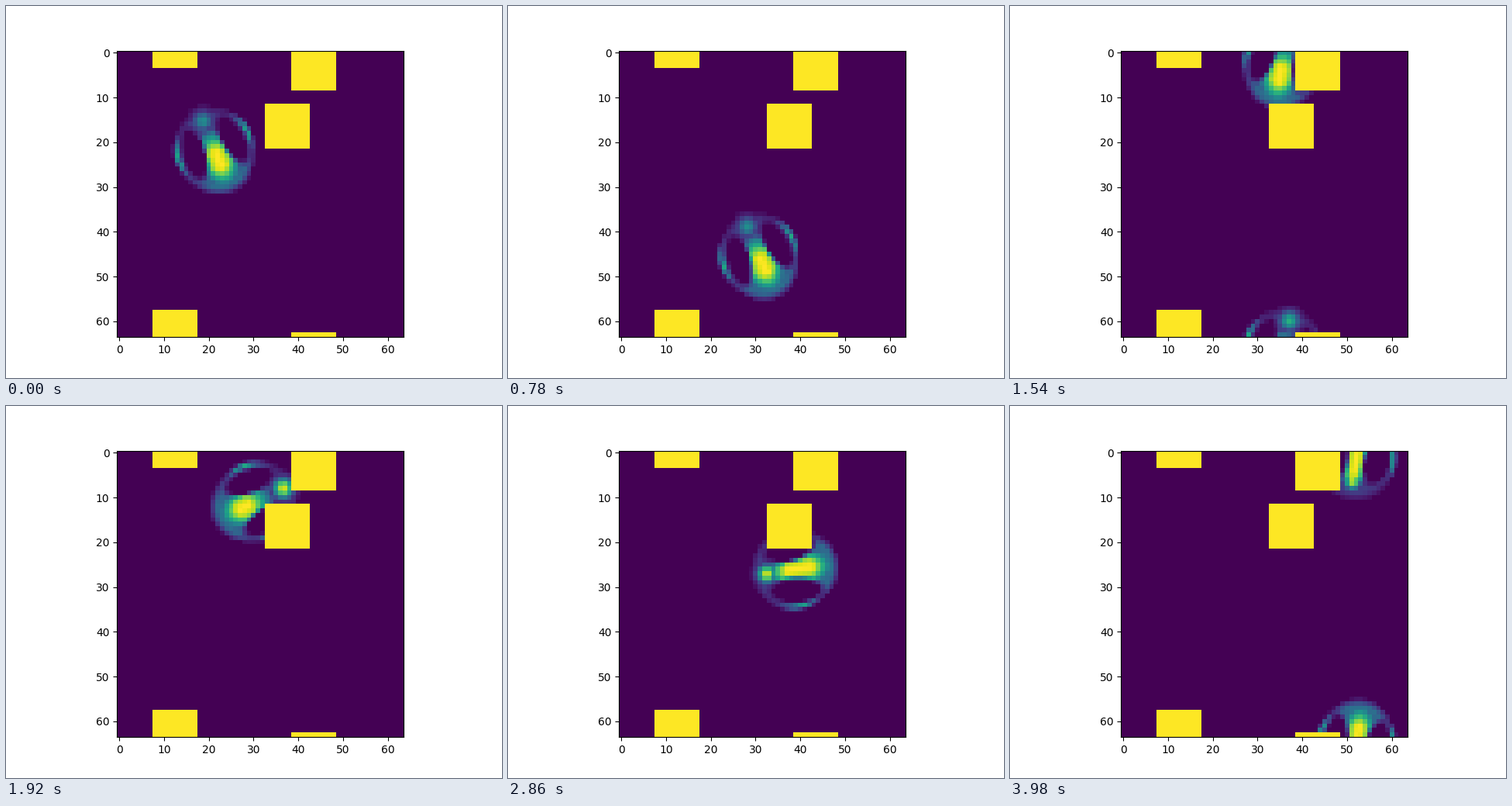
Write a matplotlib script that moves like this. It is 640x480 px and loops after 4000 ms.

```python
import numpy as np
import matplotlib.pyplot as plt
from matplotlib.animation import FuncAnimation

SIZE = 64
FRAMES = 200
BLOCK = 10

# Key poses: step, x, y (unwrapped), heading in degrees
POSES = np.array([
    (0, 21.5, 22.1, 67.5),
    (58, 35.5, 57.1, 67.5),
    (64, 36.9, 60.7, 67.5),
    (96, 30.1, 75.2, 154),
    (119, 29.7, 87.6, 78.5),
    (136, 36.5, 91, 15),
    (166, 45.3, 80.5, -73),
    (199, 52.1, 64.8, -81),
])
TIMES, KEYS = POSES[:, 0], POSES[:, 1:]
SLOPES = np.gradient(KEYS, TIMES, axis=0)

rows, cols = np.mgrid[:SIZE, :SIZE]
walls = np.zeros((SIZE, SIZE), bool)
for x, y in [(8, 58), (39, 63), (33, 12)]:
    walls |= ((cols - x) % SIZE < BLOCK) & ((rows - y) % SIZE < BLOCK)


def ramp(x):
    return np.clip(x, 0, 1)


def ease(t, start, end):
    s = ramp((t - start) / (end - start))
    return s * s * (3 - 2 * s)


def bump(x, width):
    return np.exp(-(x / width) ** 2)


def wrap(d):
    return (d + SIZE / 2) % SIZE - SIZE / 2


def pose(t):
    """Smooth cubic path through the key poses."""
    i = min(np.searchsorted(TIMES, t, side="right"), len(TIMES) - 1) - 1
    span = TIMES[i + 1] - TIMES[i]
    s = (t - TIMES[i]) / span
    curve = KEYS[i] + (KEYS[i + 1] - KEYS[i]) * s * s * (3 - 2 * s)
    return curve + span * s * (1 - s) * ((1 - s) * SLOPES[i] - s * SLOPES[i + 1])


def glider(t):
    x, y, heading = pose(t)
    dx, dy = wrap(cols - x), wrap(rows - y)
    angle = np.radians(heading)
    u = dx * np.cos(angle) + dy * np.sin(angle)  # along the heading
    v = dx * np.sin(angle) - dy * np.cos(angle)  # across it
    r = np.hypot(u, v * (1.1 + 0.008 * u))

    # The first bump lights up the tail, the next one squeezes the body
    glow = ease(t, 66, 96)
    squeeze = ease(t, 119, 166)

    body = (ramp((10 - r) / 6) * bump(v, 4.3 - 0.9 * squeeze + 0.12 * u)
            * ramp(1.02 - 0.15 * glow + 0.85 * squeeze + 0.15 * u))
    shell = (0.18 + 0.2 * ramp(u / 8)) * ramp((10.2 - r) / 2)
    field = np.maximum(body, shell)

    for side in (-1, 1):
        hole_u = (u + 1.1 - 1.1 * squeeze) / 5.5
        hole_v = (side * v - 4.75 - 0.1 * u) / (2.4 + 0.4 * squeeze)
        field = field * ramp((np.hypot(hole_u, hole_v) - 1) * 2.8 + 0.3)

    rim = 0.6 * bump(r - 9.1, 0.7) * bump(u + 1.5 - 2.5 * squeeze, 4) * (np.abs(v) > 5)
    tail = ((0.5 + 0.45 * glow)
            * bump(np.hypot(u + 7.3 - 1.6 * squeeze, v), 2.2 - 0.4 * squeeze))
    field = np.maximum(field, np.maximum(rim, tail))
    return np.where(field < 0.03, 0, field)


def world(t):
    return np.where(walls, 1, glider(t))


fig, ax = plt.subplots(figsize=(6.4, 4.8), dpi=100)
image = ax.imshow(world(0), cmap="viridis", vmin=0, vmax=1, interpolation="nearest")


def update(frame):
    image.set_data(world(frame))
    return [image]


anim = FuncAnimation(fig, update, frames=FRAMES, interval=20, repeat=True, repeat_delay=0)
plt.show()
```
